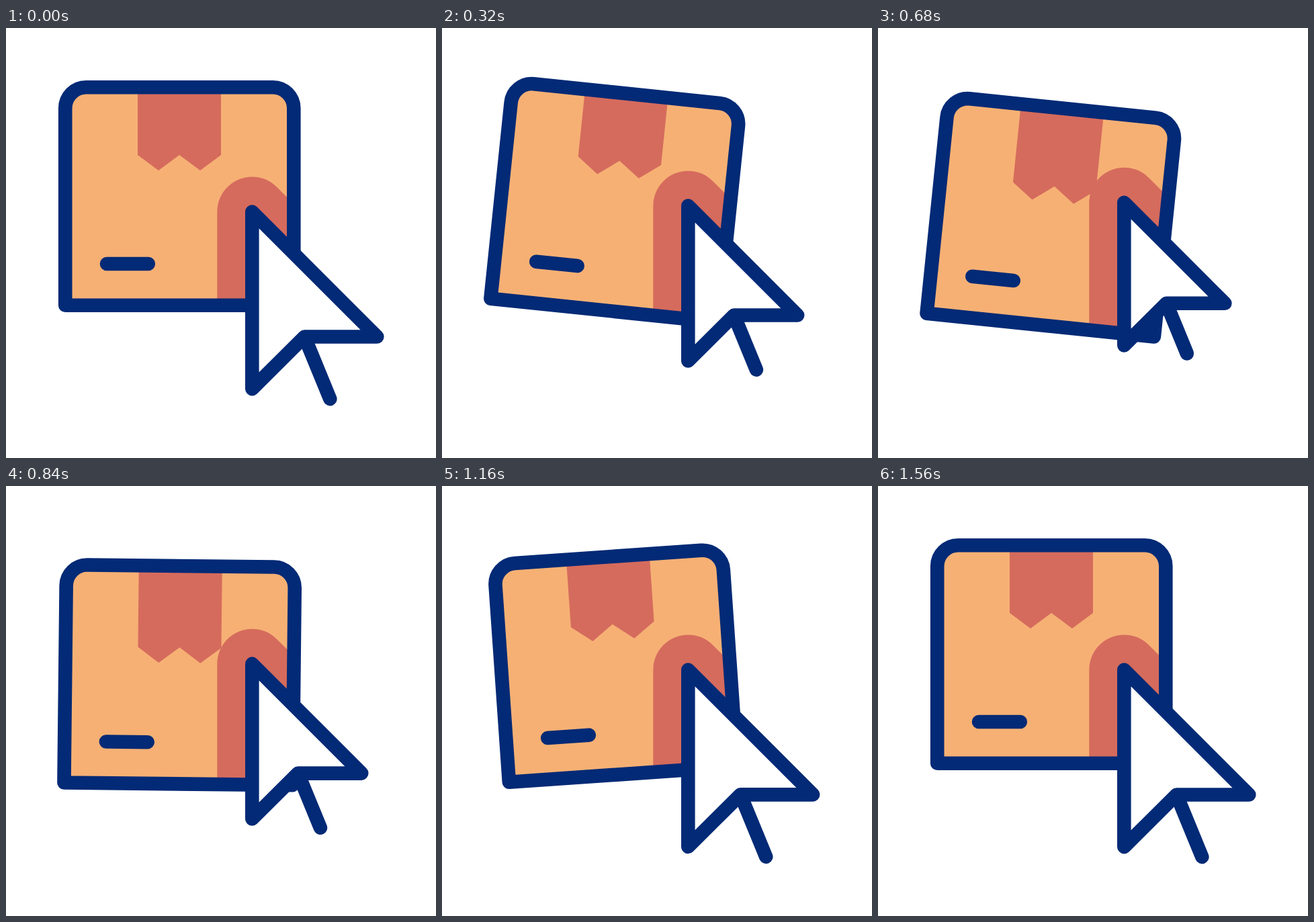
Recreate the animation shown at these times as an HTML page. Size 640 by 640 pixels, loop 1.68 s.

```html
<!DOCTYPE html>
<html lang="en">
<head>
<meta charset="utf-8">
<title>Parcel and pointer</title>
<style>
  html, body { margin: 0; height: 100%; overflow: hidden; background: #fff; }
  svg { display: block; width: 100vw; height: 100vh; }
  .line { stroke: #032a76; stroke-width: 20.6; stroke-linecap: round; stroke-linejoin: round; }
  .shade { fill: #d56b5d; }
  #shadow { stroke: #d56b5d; stroke-width: 104; stroke-linejoin: round; }
  #pointer path, #shadow { vector-effect: non-scaling-stroke; }
</style>
</head>
<body>
<svg viewBox="0 0 640 640">
  <defs>
    <path id="body" d="M88.2 412.7V119.3a31 31 0 0 1 31-31H397.3a31 31 0 0 1 31 31V412.7Z"/>
    <clipPath id="inside"><use id="clipBody" href="#body"/></clipPath>
  </defs>
  <g class="box">
    <use href="#body" fill="#f6b074"/>
    <path id="tape" class="shade"/>
  </g>
  <g clip-path="url(#inside)">
    <path id="shadow" class="shade" d="M0 0L186 186H78L0 263.6Z"/>
  </g>
  <g class="box line" fill="none">
    <use href="#body"/>
    <path d="M150 351H211.8"/>
  </g>
  <g id="pointer" class="line" fill="#fff">
    <path d="M78 186L116 278.6"/>
    <path d="M0 0L186 186H78L0 263.6Z"/>
  </g>
</svg>
<script>
const LOOP = 1680, STEP = 40;
const $ = id => document.getElementById(id);
const boxParts = [...document.querySelectorAll('.box'), $('clipBody')];

// Each track is a list of [time, value] keys joined by smooth easing.
const tilt = [[40, 0], [460, 8], [540, 8], [1060, -4], [1140, -4], [1520, 0]];
const drop = [[110, 0], [720, 30.7], [840, 30.7], [1520, 0]];
const stretch = [[445, 0], [780, 20.6], [840, 20.6], [1140, 0]];
const press = [[40, 0], [540, 1], [572, 1], [1180, 0]];

function valueAt(keys, t) {
  const next = keys.findIndex(([time]) => time > t);
  if (next === 0) return keys[0][1];
  if (next < 0) return keys[keys.length - 1][1];
  const [t0, a] = keys[next - 1], [t1, b] = keys[next];
  const u = (t - t0) / (t1 - t0);
  return a + (b - a) * u * u * (3 - 2 * u);
}

function draw(t) {
  const boxMove = `translate(0 ${valueAt(drop, t)}) rotate(${valueAt(tilt, t)} 258.2 250.5)`;
  boxParts.forEach(part => part.setAttribute('transform', boxMove));

  const side = 189 + valueAt(stretch, t);
  $('tape').setAttribute('d', `M196 90V${side}l31 23l31 -23l31 23l31 -23V90Z`);

  const p = valueAt(press, t);
  const pointerMove = `translate(366.3 ${273.5 - 15 * p}) scale(${1 - 0.211 * p})`;
  $('pointer').setAttribute('transform', pointerMove);
  $('shadow').setAttribute('transform', pointerMove);
}

const start = performance.now();
function tick() {
  const t = (performance.now() - start) % LOOP;
  draw(Math.floor(t / STEP) * STEP);
  requestAnimationFrame(tick);
}
tick();
</script>
</body>
</html>
```
